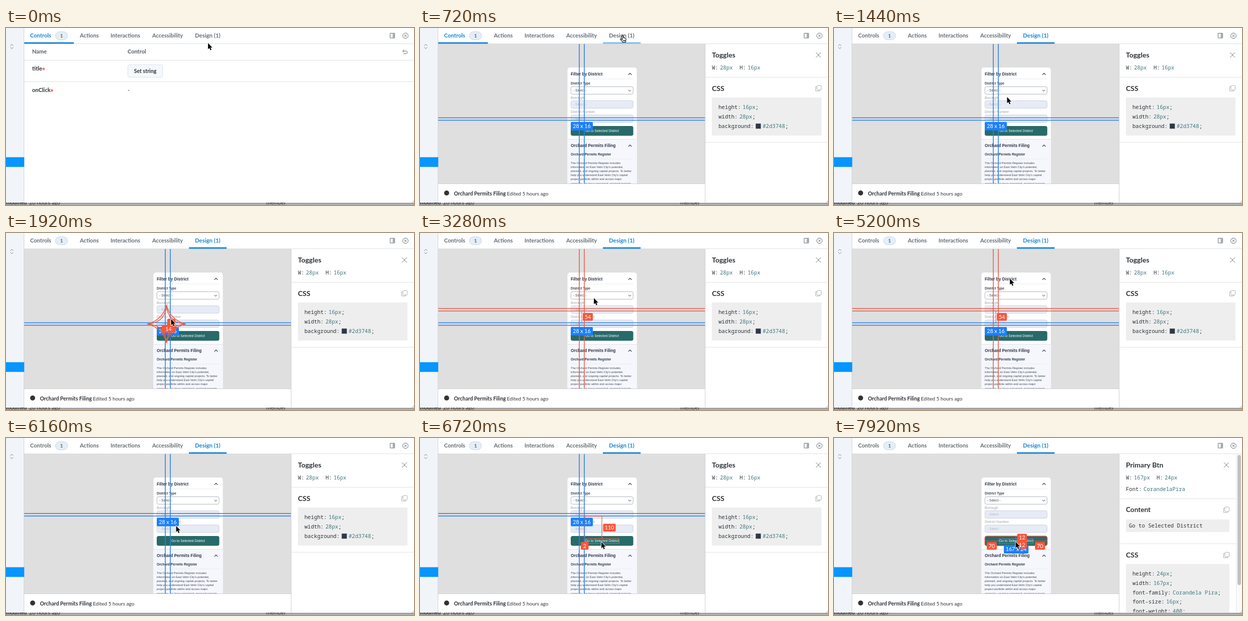
Animation of 812 by 354 pixels, one loop 8 s. Source, as an HTML page with a canvas:

```html
<!DOCTYPE html>
<html lang="en">
<head>
<meta charset="utf-8">
<title>Design panel</title>
<style>
html, body { margin: 0; width: 100%; height: 100%; overflow: hidden; background: #fff; }
canvas { display: block; }
</style>
</head>
<body>
<canvas id="stage" width="812" height="354"></canvas>
<script>
const ctx = document.getElementById('stage').getContext('2d');
const LOOP = 8000, STEP = 80;
const UI = 'Lato, sans-serif', MONO = '"Noto Sans Mono", monospace', ARIAL = '"Liberation Sans", Arial, sans-serif';
const BLUE = '#2f80e8', RED = '#e8604c', TAB = '#1a86d2', GREY = '#646e76', INK = '#2e3338', TEAL = '#41777d', LINE = '#dcdfe3';
const TITLE = 'Orchard Permits Filing';

// Time, x and y of the pointer tip
const PATH = [
  [0, 401.5, 29.5], [80, 401.5, 29.5], [240, 401.5, 14], [880, 401.5, 14], [1680, 328, 171.5],
  [2320, 328, 171.5], [2720, 324, 152], [3280, 345.5, 129.5], [4080, 347, 126],
  [4880, 349.5, 90.5], [5280, 349.5, 90.5], [5680, 322, 152], [5840, 322, 152],
  [6560, 360.5, 207.5], [7040, 360.5, 207.5], [7280, 361, 207]
];

// Text centred vertically on its capital height
function text(s, x, cy, size, color, font = UI, weight = 400, align = 'left') {
  ctx.font = `${weight} ${size}px ${font}`;
  ctx.fillStyle = color;
  ctx.textAlign = align;
  ctx.fillText(s, x, cy + size * 0.36);
}
const bold = (s, x, cy, size, color, font = UI) => text(s, x, cy, size, color, font, 700);
const mono = (s, x, cy, color = INK) => text(s, x, cy, 10.64, color, MONO);

function fill(x, y, w, h, color) {
  ctx.fillStyle = color;
  ctx.fillRect(x, y, w, h);
}
function box(x, y, w, h, r, color, border, width = 1) {
  ctx.beginPath();
  ctx.roundRect(x, y, w, h, r);
  if (color) { ctx.fillStyle = color; ctx.fill(); }
  if (border) { ctx.strokeStyle = border; ctx.lineWidth = width; ctx.stroke(); }
}
function poly(pts, color, width = 1) {
  ctx.beginPath();
  for (let i = 0; i < pts.length; i += 2) ctx.lineTo(pts[i], pts[i + 1]);
  ctx.strokeStyle = color;
  ctx.lineWidth = width;
  ctx.stroke();
}
function clip(x, y, w, h, draw) {
  ctx.save();
  ctx.beginPath();
  ctx.rect(x, y, w, h);
  ctx.clip();
  draw();
  ctx.restore();
}
function tag(s, x, y, w, h, color) {
  box(x, y, w, h, 2, color);
  text(s, x + w / 2, y + h / 2, 10.6, '#fff', UI, 400, 'center');
}
const redTag = (s, x, y, w) => tag(s, x, y, w, 15.5, '#f9563c');
const blueTag = (s, x, y, w) => tag(s, x, y, w, 17, '#1c80f8');

function cross(x, y, r, color) {
  poly([x - r, y - r, x + r, y + r], color);
  poly([x + r, y - r, x - r, y + r], color);
}
function copyIcon(x, y) {
  poly([x - 3, y - 3, x - 5.5, y - 3, x - 5.5, y + 5.5, x + 2.5, y + 5.5, x + 2.5, y + 3.5], '#a3a7ab', 0.9);
  box(x - 3, y - 5.5, 8.5, 9, 1.5, '#fff', '#a3a7ab', 0.9);
}

function tabs(t) {
  const design = t >= 800;
  fill(36, 0, 776, 31, '#fff');
  fill(36, 31, 776, 1, LINE);
  bold('Controls', 48, 15.5, 11.1, design ? GREY : TAB);
  box(98.5, 7.5, 24, 16, 8, '#e5eef7', '#c5d6e6');
  text('1', 110.5, 15.5, 9.6, '#55626e', UI, 700, 'center');
  bold('Actions', 147, 15.5, 11.1, GREY);
  bold('Interactions', 208, 15.5, 11.1, GREY);
  bold('Accessibility', 291, 15.5, 11.1, GREY);
  bold('Design (1)', 376, 15, 11.4, design ? TAB : GREY);
  if (!design) fill(36, 28.5, 99, 3, TAB);
  if (t >= 560) fill(364, 28.5, 75, 3, design ? TAB : '#7cbdea');

  box(764.5, 10.5, 9, 9.5, 0, null, '#697178');
  poly([770.5, 10, 770.5, 20], '#697178');
  poly([772, 12, 772, 18.5], '#697178', 0.8);
  ctx.beginPath();
  ctx.arc(795, 15.5, 5.4, 0, 7);
  ctx.strokeStyle = '#697178';
  ctx.lineWidth = 1;
  ctx.stroke();
  cross(795, 15.5, 2.2, '#555d64');
}

function frame() {
  fill(0, 0, 812, 354, '#fff');
  fill(0, 0, 36, 350, '#f1f5fa');
  poly([8.5, 35.5, 11.5, 32.5, 14.5, 35.5], '#737d86');
  poly([8.5, 38.5, 11.5, 41.5, 14.5, 38.5], '#737d86');
}
function edges() {
  fill(35.3, 0, 1, 350, '#ced3d8');
  fill(0, 258.4, 36.3, 19.4, '#0795ff');
  const shade = ctx.createLinearGradient(0, 349, 0, 354);
  shade.addColorStop(0, '#e6e6e6');
  shade.addColorStop(0.45, '#8c8c8e');
  shade.addColorStop(1, '#cfcfd0');
  fill(0, 349, 812, 5, shade);
  clip(0, 349, 812, 5, () => {
    bold('modified', 0, 349.5, 10.5, '#333');
    text('20 hours ago', 46, 349.5, 10.8, '#333');
    text('member', 518, 349.5, 10.8, '#333');
    fill(600, 351, 1, 3, '#aaa');
  });
  poly([807, 350, 810, 348.5, 812, 345], '#a8a8a8');
}

function required(label, x, cy, starX) {
  bold(label, x, cy, 11.1, INK);
  bold('*', starX, cy + 4.4, 17, '#e8503c');
}
function controls() {
  bold('Name', 52, 47.5, 11, '#555f67');
  bold('Control', 242, 47.5, 11, '#555f67');
  fill(36, 64, 776, 1, LINE);
  required('title', 52, 81.5, 71.3);
  box(242.5, 73.5, 69, 25, 3, '#f5f8fc', '#dbe1ea');
  text('Set string', 277, 86, 10.6, INK, UI, 700, 'center');
  fill(36, 107, 776, 1, LINE);
  required('onClick', 52, 124.5, 87.8);
  text('-', 242, 124.5, 11, INK);
  poly([792.5, 43, 789.5, 46, 792.5, 49], '#69737b');
  ctx.beginPath();
  ctx.moveTo(789.5, 46);
  ctx.lineTo(796, 46);
  ctx.arc(796, 48.7, 2.7, -Math.PI / 2, Math.PI / 2);
  ctx.lineTo(791, 51.4);
  ctx.stroke();
}

function select(y, on) {
  box(300.4, y + 0.4, 123.7, 15, 3, on ? '#fff' : '#e6ebf5', on ? '#8e949c' : '#bcc5d3', 0.7);
  text('- Select -', 305, y + 8, 6.6, on ? '#444a52' : '#b3b9c4', ARIAL);
  if (on) poly([414.7, y + 7, 417.3, y + 9.4, 419.9, y + 7], '#333');
}
function card() {
  box(293.5, 79, 138, 250, 5, '#fff');
  fill(293.5, 222, 138, 100, '#f5f7fc');
  fill(293.5, 222, 138, 1, '#dde1e9');
  bold('Filter by District', 300, 92, 8.3, '#2d3748', ARIAL);
  bold(TITLE, 300, 235.5, 8.3, '#2d3748', ARIAL);
  for (const y of [92, 235.5]) poly([414.8, y + 1.6, 418, y - 1.6, 421.2, y + 1.6], '#2d3748', 1.3);
  fill(300, 101.5, 124, 0.8, '#e2e5ea');
  bold('District Type', 300, 111, 6.5, '#3c4450', ARIAL);
  select(117, true);
  text('Borough', 300, 139.3, 7, '#a0a3aa', ARIAL);
  select(145, false);
  text('District Number', 300, 167.7, 7, '#a0a3aa', ARIAL);
  select(173.5, false);
  box(300, 196, 124.5, 19.5, 4, '#286a69');
  text('Go to Selected District', 329, 206, 6.73, '#fff', ARIAL);
  bold('Orchard Permits Register', 300, 253, 6.65, '#2d3748', ARIAL);
  fill(300, 261.5, 124, 0.8, '#e3e7ed');
  [
    'The Orchard Permits Register includes',
    "information on East Velm City's potential,",
    'planned, and ongoing capital projects. To better',
    "help you understand East Velm City's capital",
    'project portfolio within and across major',
    'agencies, we have organized, mapped projects'
  ].forEach((s, i) => text(s, 300, 270 + i * 8.1, 5.75, '#3c434f', ARIAL));
}

// Pair of guides around a toggle
function rows(y, color) {
  for (const v of [y, y + 5]) fill(36, v - 0.8, 531, 1.6, color);
}
function columns(color) {
  for (const x of [317, 327]) fill(x - 0.8, 32, 1.6, 279, color);
}
function star(x, y) {
  for (const [bend, width] of [[8, 1.4], [2.5, 1.6]]) {
    for (const [sx, sy] of [[1, 1], [1, -1], [-1, 1], [-1, -1]]) {
      ctx.beginPath();
      ctx.moveTo(x + sx * 38, y);
      ctx.quadraticCurveTo(x + sx * bend, y + sy * bend, x, y + sy * 37.5);
      ctx.strokeStyle = RED;
      ctx.lineWidth = width;
      ctx.stroke();
    }
  }
  redTag('8', 321, 171.5, 16);
  redTag('14', 310, 184, 27);
}

function guides(t) {
  if (t >= 7120) {
    box(300.3, 196.3, 124, 19, 4, null, '#e0553f', 1.4);
    box(328.5, 201.5, 68, 9.5, 0, null, '#4a9fd4', 0.8);
    poly([301, 206, 328, 206], RED);
    poly([397, 206, 424, 206], RED);
    poly([362, 196, 362, 201], RED);
    poly([362, 211, 362, 215], RED);
    blueTag('167 x 24', 338, 214, 49);
    redTag('12', 364.5, 191.5, 19.5);
    redTag('12', 364.5, 206, 19.5);
    redTag('70', 304, 208, 20);
    redTag('70', 400, 208, 20);
    return;
  }
  const moved = t >= 5680;
  const hover = t >= 2640 && !moved;
  rows(moved ? 151 : 179.5, BLUE);
  columns(hover ? RED : BLUE);
  if (hover) {
    rows(151, RED);
    poly([322, 156, 322, 179], RED);
  }
  blueTag('28 x 16', 300, moved ? 159.5 : 188, 44);
  if (hover) redTag('54', 324, 160, 20);
  if (t >= 1680 && t < 2640) star(319.5, 182);
  if (t >= 6320) {
    box(328.5, 201.5, 68, 9.5, 0, null, '#f0604a');
    poly([327, 156.5, 362, 156.5, 362, 201], RED, 1.2);
    ctx.setLineDash([2, 2]);
    poly([328, 157, 328, 201], RED);
    ctx.setLineDash([]);
    redTag('110', 364.5, 171.5, 25);
    redTag('2', 320, 208, 15.5);
  }
}

function prop(name, value, x, y) {
  mono(name + ':', x, y);
  const vx = x + (name.length + 1) * 6.384 + 3.4;
  mono(value, vx, y, TEAL);
  mono(';', vx + value.length * 6.384, y);
}
function measure(name, value, x, y) {
  mono(name + ':', x, y);
  mono(value, x + (name.length + 1) * 6.384 + 3.2, y, TEAL);
}
function inspector(button) {
  const right = button ? 801 : 812, icon = button ? 781 : 793;
  fill(567, 32, 245, 318, '#fff');
  fill(567, 32, 1, 318, '#cfcfcf');
  bold(button ? 'Primary Btn' : 'Toggles', 581, 53.5, 14, INK);
  cross(icon, 54, 5, '#777c80');
  measure('W', button ? '167px' : '28px', 581, 79);
  measure('H', button ? '24px' : '16px', button ? 642 : 636, 79);
  if (!button) {
    fill(568, 98, 244, 1, '#e2e2e2');
    bold('CSS', 581, 120.5, 14, INK);
    copyIcon(icon, 120.5);
    fill(581, 139, 218, 76, '#eeeeee');
    prop('height', '16px', 594, 158.5);
    prop('width', '28px', 594, 177);
    mono('background:', 594, 196);
    box(668, 191, 10.5, 10.5, 0, '#2d3748', '#c8c8c8', 0.6);
    mono('#2d3748', 682, 196, TEAL);
    mono(';', 726.7, 196);
    fill(568, 228, 244, 1, '#e2e2e2');
    return;
  }
  measure('Font', 'CorandelaPira', 581, 102);
  fill(568, 121, right - 568, 1, '#e2e2e2');
  bold('Content', 581, 143.5, 13.6, INK);
  copyIcon(icon, 143.5);
  fill(581, 163, 206, 25, '#eeeeee');
  mono('Go to Selected District', 587, 175.5);
  fill(568, 211, right - 568, 1, '#e2e2e2');
  bold('CSS', 581, 234, 14, INK);
  copyIcon(icon, 234);
  fill(581, 252, 206, 98, '#eeeeee');
  [['height', '24px'], ['width', '167px'], ['font-family', 'Corandela Pira'], ['font-size', '16px'], ['font-weight', '400']]
    .forEach(([name, value], i) => prop(name, value, 594, 271.5 + i * 18.7));
  fill(801, 32, 11, 318, '#fafafa');
  fill(800, 32, 1, 318, '#e8e8e8');
  box(803, 34, 7, 260, 3.5, '#c1c1c1');
}

function design(t) {
  fill(36, 32, 531, 279, '#dfdfdf');
  clip(36, 32, 531, 279, () => { card(); guides(t); });
  fill(36, 311, 531, 39, '#fff');
  fill(36, 311, 531, 1, '#cfcfcf');
  ctx.beginPath();
  ctx.arc(53, 330, 5, 0, 7);
  ctx.fillStyle = '#333';
  ctx.fill();
  bold(TITLE, 67.5, 331.5, 10.4, INK);
  text('Edited 5 hours ago', 173, 331.5, 10.05, INK);
  inspector(t >= 7120);
}

function pointer(t) {
  let i = PATH.findIndex(p => p[0] > t);
  if (i < 0) i = PATH.length;
  const a = PATH[i - 1], b = PATH[i] || a;
  const k = b === a ? 0 : (t - a[0]) / (b[0] - a[0]);
  const e = k * k * (3 - 2 * k);
  const x = a[1] + (b[1] - a[1]) * e, y = a[2] + (b[2] - a[2]) * e;
  ctx.save();
  ctx.translate(x, y);
  ctx.lineJoin = 'round';
  if (y < 28) {
    const hand = new Path2D('M.5 1.5Q1.7-.3 2.8 1.5L3.3 6Q4.4 4.8 5.3 6.2Q6.4 5.4 7.2 6.8Q8.8 6.5 8.6 8.5L8 12.5L7.4 14.5H1.7L1 12.7L-2.8 8.8Q-2.6 7.2-1 8L1.2 9.6Z');
    ctx.fillStyle = '#fff';
    ctx.fill(hand);
    ctx.strokeStyle = '#111';
    ctx.lineWidth = 1.1;
    ctx.stroke(hand);
    ctx.stroke(new Path2D('M3.2 10V12.5M5 10V12.5M6.6 10V12.5'));
  } else {
    const arrow = new Path2D('M.5.5V13L3.3 10.4L5.2 15L7.4 14L5.4 9.7H9.2Z');
    ctx.strokeStyle = '#fff';
    ctx.lineWidth = 1.8;
    ctx.stroke(arrow);
    ctx.fillStyle = '#0a0a0a';
    ctx.fill(arrow);
  }
  ctx.restore();
}

function draw(now) {
  const t = Math.floor((now % LOOP) / STEP) * STEP;
  frame();
  if (t < 640) controls(); else design(t);
  tabs(t);
  edges();
  pointer(t);
}

const start = performance.now();
function tick() {
  draw(performance.now() - start);
  requestAnimationFrame(tick);
}
tick();
</script>
</body>
</html>
```
